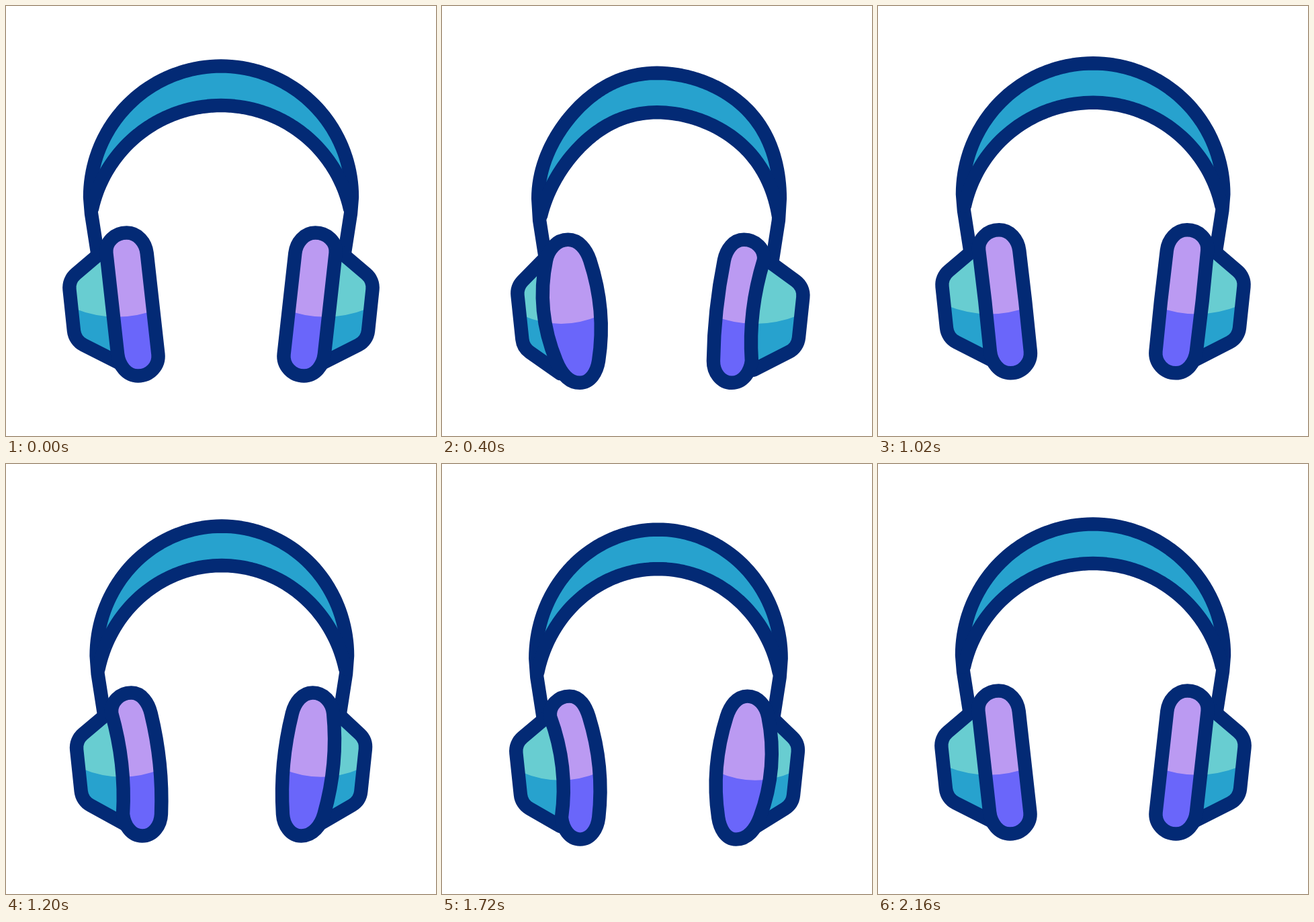
An HTML page with a canvas that plays this animation: 640x640 px, repeating every 2.4 s.

```html
<!DOCTYPE html>
<html lang="en">
<head>
<meta charset="utf-8">
<title>Headphones</title>
<style>
html, body { margin: 0; width: 100%; height: 100%; overflow: hidden; background: #fff; }
canvas { display: block; width: 640px; height: 640px; }
</style>
</head>
<body>
<canvas id="stage" width="640" height="640"></canvas>
<script>
const ctx = document.getElementById('stage').getContext('2d');
const LOOP = 2400, DROP = 10.2;
const NAVY = '#032a75', BLUE = '#27a2ce', MINT = '#68cdd1', LILAC = '#bb9af2', INDIGO = '#6a66fa';

// first turn, second turn and lift at each time; bias delays the start of the move
const keys = [
  { t: 0, pose: [0, 0, 0] },
  { t: 475, pose: [1.08, 0, 0], bias: 1 },
  { t: 955, pose: [0, 0, -5], bias: 1.7 },
  { t: 1430, pose: [0, 1.012, 0], bias: 1 },
  { t: 2165, pose: [0, 0, 0], bias: 1.3 }
];

// Poses: front, first turn, second turn.
// band: left, right, apex, height, skew
const band = [[125, 515, 320, 195, 0], [143, 503, 320, 187, 5], [143, 502, 322, 191, 0]];
// cup: outer corner, slope above, slope below
// pad: top left, top right, bottom right, bottom left, lowest, left bow, right bow
const cupFront = [93, 0.85, 0.505];
const padFront = [149.4, 209.7, 226.4, 166.1, 196.5, 0, 0];
const left = {
  cup: [cupFront, [111, 1.02, 0.7], [113, 0.84, 0.59]],
  pad: [padFront, [155, 220, 233, 170, 205, 11.5, 9], [164, 221, 235, 181, 208, -12, 10]]
};
const right = {
  cup: [cupFront, [101, 0.73, 0.51], [113, 1, 0.65]],
  pad: [padFront, [161, 220, 236, 179, 208.5, -7, 3.5], [156, 218, 229.5, 167, 204, 13.5, 11]]
};

function poseAt(t) {
  const i = keys.findIndex(k => k.t > t);
  if (i < 0) return keys[keys.length - 1].pose;
  const a = keys[i - 1], b = keys[i];
  const u = Math.pow((t - a.t) / (b.t - a.t), b.bias);
  const e = u * u * (3 - 2 * u);
  return a.pose.map((v, n) => v + (b.pose[n] - v) * e);
}

function mix([p, q, r], w1, w2) {
  return p.map((v, i) => v + (q[i] - v) * w1 + (r[i] - v) * w2);
}

function toward(a, b) {
  const x = b[0] - a[0], y = b[1] - a[1], d = Math.hypot(x, y);
  return [x / d, y / d];
}

// Near-circular curve between two points with given directions
function bend(path, a, da, b, db) {
  const turn = Math.acos(Math.max(-1, Math.min(1, da[0] * db[0] + da[1] * db[1])));
  const h = Math.hypot(b[0] - a[0], b[1] - a[1]) * 2 / 3 / (1 + Math.cos(turn / 2));
  path.bezierCurveTo(a[0] + da[0] * h, a[1] + da[1] * h, b[0] - db[0] * h, b[1] - db[1] * h, ...b);
}

// Points of an arch from its left end to its right end
function arch(l, r, apex, top, height, skew, end) {
  const pts = [];
  for (let i = -40; i <= 40; i++) {
    const a = i / 40 * end;
    const half = (i < 0 ? apex - l : r - apex) / Math.sin(end);
    pts.push([apex + half * Math.sin(a) + skew * Math.sin(2 * a) ** 2,
              top + height * (1 - Math.cos(a))]);
  }
  return pts;
}

function line(pts) {
  const path = new Path2D();
  for (const p of pts) path.lineTo(...p);
  return path;
}

function drawBand(w1, w2) {
  const [l, r, apex, height, skew] = mix(band, w1, w2);
  const outer = arch(l, r, apex, 89.5, height, skew, Math.PI / 2);
  const inner = arch(l + 3, r - 3, apex, 148, 196.7, skew, 1.351);
  const dome = [[l + 2, 309], ...outer, [r - 2, 309]];
  ctx.fillStyle = BLUE;
  ctx.fill(line([...dome, ...inner.slice().reverse()]));
  ctx.stroke(line([[l + 11, 367], ...dome, [r - 11, 367]]));
  ctx.stroke(line(inner));
}

function cupPath([x, rise, fall]) {
  const inX = 158, endX = 176, lowX = x + 9.5;
  const low = 498 + fall * (endX - lowX);
  const path = new Path2D();
  path.moveTo(inX, 408 - rise * (inX - x));
  path.arcTo(x, 408, lowX, 498, 27);
  path.arcTo(lowX, 498, endX, low, 27);
  path.lineTo(endX, low);
  return path;
}

function padPath([x0, x1, x2, x3, low, bowL, bowR]) {
  const a = [x0, 368], b = [x1, 368], c = [x2, 518], d = [x3, 518];
  const crown = [(x0 + x1) / 2, 337.5], foot = [low, 550.5];
  const sideL = bow => [(x0 + x3) / 2 - 2 * bow, 443];
  const sideR = bow => [(x1 + x2) / 2 + 2 * bow, 443];
  const aimL = sideL(Math.max(bowL, 0)), aimR = sideR(Math.max(bowR, 0));
  const path = new Path2D();
  path.moveTo(...a);
  bend(path, a, toward(aimL, a), crown, [1, 0]);
  bend(path, crown, [1, 0], b, toward(b, aimR));
  path.quadraticCurveTo(...sideR(bowR), ...c);
  bend(path, c, toward(aimR, c), foot, [-1, 0]);
  bend(path, foot, [-1, 0], d, toward(d, aimL));
  path.quadraticCurveTo(...sideL(bowL), ...a);
  path.closePath();
  return path;
}

function twoTone(shape, top, low, from, to) {
  const floor = new Path2D();
  floor.moveTo(from, 450);
  floor.quadraticCurveTo((from + to) / 2, 475, to, 451);
  floor.lineTo(to + 40, 440);
  floor.lineTo(to + 40, 620);
  floor.lineTo(from - 40, 620);
  floor.lineTo(from - 40, 440);
  ctx.save();
  ctx.clip(shape);
  ctx.fillStyle = top;
  ctx.fillRect(0, 250, 400, 370);
  ctx.fillStyle = low;
  ctx.fill(floor);
  ctx.restore();
}

function drawSide(side, w1, w2) {
  const cup = mix(side.cup, w1, w2), pad = mix(side.pad, w1, w2);
  const from = cup[0] + 8, to = pad[2];
  const shell = cupPath(cup), cushion = padPath(pad);
  const body = new Path2D(shell);
  body.lineTo(190, 460);
  body.closePath();
  twoTone(body, MINT, BLUE, from, to);
  ctx.stroke(shell);
  twoTone(cushion, LILAC, INDIGO, from, to);
  ctx.stroke(cushion);
}

function draw(t) {
  const [w1, w2, lift] = poseAt(t);
  ctx.setTransform(1, 0, 0, 1, 0, 0);
  ctx.fillStyle = '#fff';
  ctx.fillRect(0, 0, 640, 640);
  ctx.strokeStyle = NAVY;
  ctx.lineWidth = 20.4;
  ctx.lineJoin = ctx.lineCap = 'round';
  ctx.translate(0, DROP * (w1 + w2) + lift);
  drawBand(w1, w2);
  drawSide(left, w1, w2);
  ctx.transform(-1, 0, 0, 1, 640, 0);
  drawSide(right, w1, w2);
}

const start = performance.now();
function tick() {
  draw((performance.now() - start) % LOOP);
  requestAnimationFrame(tick);
}
tick();
</script>
</body>
</html>
```
